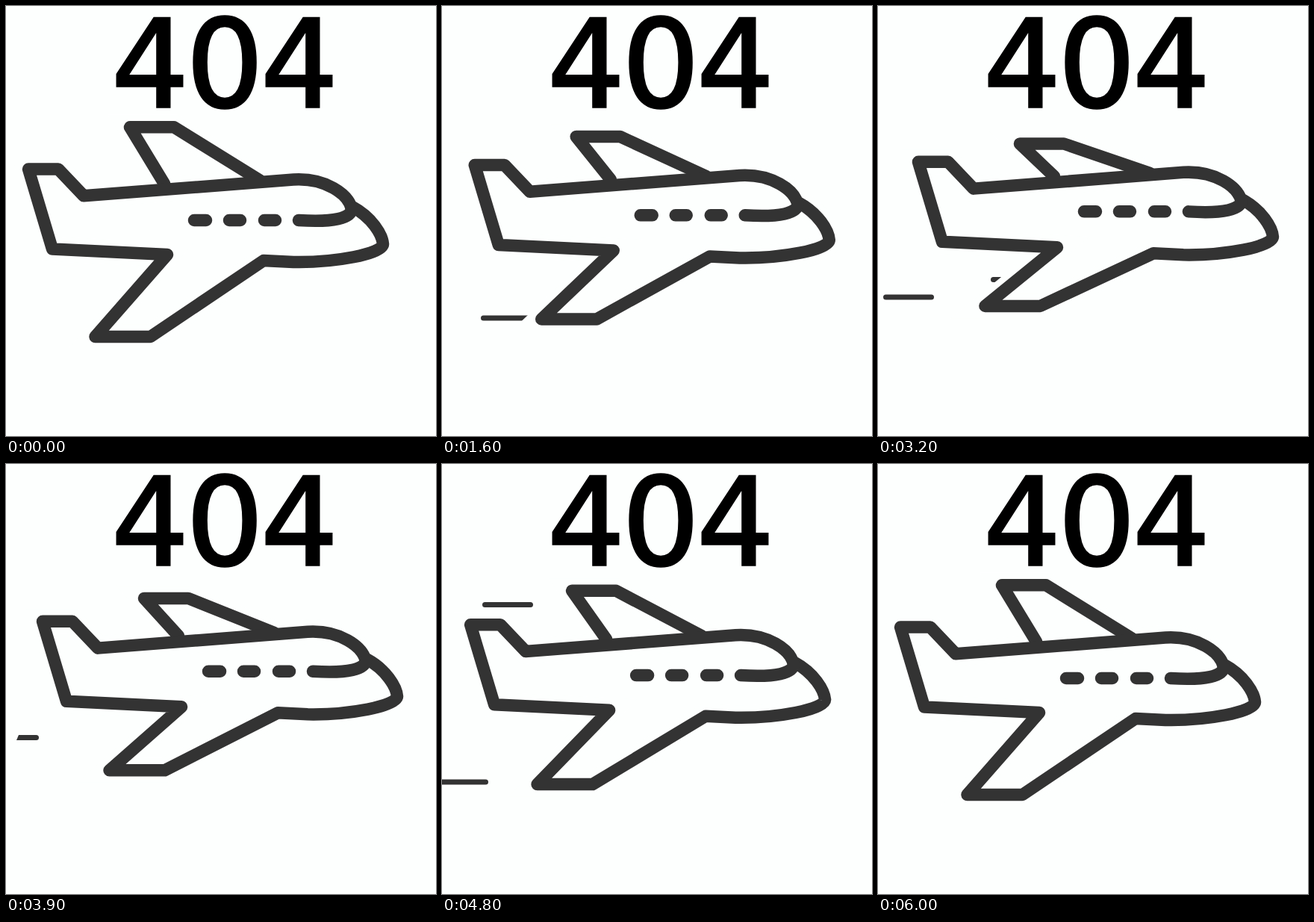
Recreate the animation shown at these times as an HTML page. Size 576 by 576 pixels, loop 6100 ms.

```html
<!DOCTYPE html>
<html lang="en">
<head>
<meta charset="utf-8">
<title>404</title>
<style>
  html, body { margin: 0; height: 100%; overflow: hidden; background: #fdfffe; }
  svg { display: block; width: 100%; height: 100%; }
  text { font: 163px "DejaVu Sans", sans-serif; letter-spacing: -3.7px; text-anchor: middle; stroke: #000; stroke-width: 3.3; }
  path { fill: none; stroke: #333; stroke-width: 16.5; stroke-linecap: round; stroke-linejoin: round; }
  .streak { stroke-width: 7.2; }
  .halo { fill: #fdfffe; stroke: #fdfffe; stroke-width: 33; stroke-linejoin: miter; stroke-linecap: butt; }
</style>
</head>
<body>
<svg viewBox="0 0 576 576">
  <text x="291.3" y="135.3">404</text>
  <g id="streaks"></g>
  <g id="plane">
    <path class="halo wing"/>
    <path class="halo hull"/>
    <path class="wing"/>
    <path class="hull"/>
    <path id="windows" d="M252 287h16M299 287h15M346 287h15M463 272C462 284 440 290 392 287"/>
  </g>
</svg>
<script>
const LOOP = 6100, STEP = 100, SPEED = 0.25, LENGTH = 68, CAP = 3.6;

// Each streak flies left and has left the stage at time `gone`.
const streaks = [
  { y: 389, gone: 920 },
  { y: 418, gone: 2080 },
  { y: 390, gone: 3500 },
  { y: 366.5, gone: 4076, cut: 15 },
  { y: 426, gone: 5048 },
  { y: 188.5, gone: 5288 },
];

const $ = id => document.getElementById(id);
const setPath = (selector, d) =>
  document.querySelectorAll(selector).forEach(el => el.setAttribute('d', d));
const move = (id, x, y) => $(id).setAttribute('transform', `translate(${x} ${y})`);

const hull = tip => `M463 272C459 252 428 230 385 232.5L104 254.3 70 218.5H30L62 325.5 216 333
  119.5 ${tip}H193.5L345 341 385 343C440 344 505 332 505 319C504 306 490 283 464 269`;
const wing = tip => `M212 238L166 ${tip}H225L340 233.5`;

function streak({ y, gone, cut }, t) {
  const right = (gone - t) * SPEED;
  if (right <= 0 || right > 225) return '';
  const left = right - LENGTH, end = right - CAP;
  if (cut && left < cut) {
    if (end <= cut) return '';
    return `<path d="M${cut + 2} ${y - CAP}H${end}a${CAP} ${CAP} 0 0 1 0 ${2 * CAP}H${cut - 1}z"
      style="fill:#333;stroke:none"/>`;
  }
  return `<path class="streak" d="M${left + CAP} ${y}H${end}"/>`;
}

function draw() {
  const t = Math.floor(performance.now() % LOOP / STEP) * STEP;
  const bank = (1 - Math.cos((t + 25) / 3000 * Math.PI)) / 2;
  move('plane', 24.3 * bank, -9.8 * bank);
  move('windows', 0, -2 * bank);
  setPath('.hull', hull(443 - 31.9 * bank));
  setPath('.wing', wing(162.3 + 32.3 * bank));
  $('streaks').innerHTML = streaks.map(s => streak(s, t)).join('');
  requestAnimationFrame(draw);
}
draw();
</script>
</body>
</html>
```
